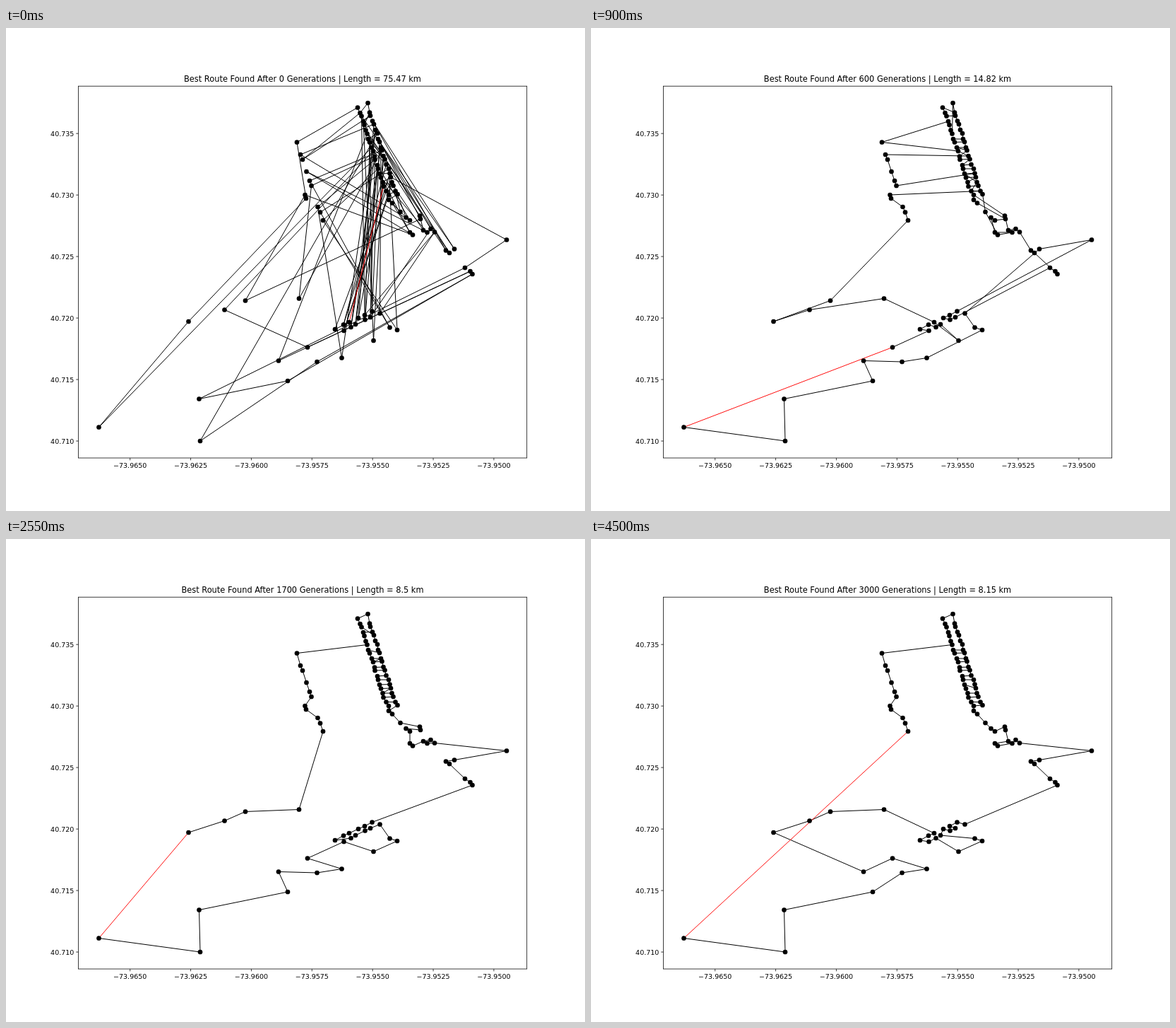
Write an HTML page that moves like this. It is 820x683 px and loops after 4650 ms.

```html
<!DOCTYPE html>
<html lang="en">
<head>
<meta charset="utf-8">
<style>
html, body { margin: 0; width: 100%; height: 100%; overflow: hidden; background: #fff; }
svg { display: block; }
text { font: 9.49px "DejaVu Sans", sans-serif; }
#title { font-size: 11.39px; }
path, rect { fill: none; stroke: #000; stroke-width: .76; }
#route { stroke-width: 1; stroke-linejoin: round; }
#closing { stroke: #f00; stroke-width: .95; }
</style>
</head>
<body>
<svg width="820" height="683" viewBox="0 0 820 683">
  <path id="route"/>
  <path id="closing"/>
  <g id="dots"></g>
  <rect x="102.5" y="82.2" width="635.2" height="525.8"/>
  <g id="axes"></g>
  <text id="title" x="420" y="76" text-anchor="middle"></text>
</svg>
<script>
const $ = id => document.getElementById(id);

// Stops as x, y pairs, grouped by area
const stops = {
  A: [412,161.5, 417,179, 420,186, 425.5,203, 430,216, 432.5,223, 423.5,236, 425,241,
    441.5,253, 445,260.5, 449,272],
  W: [498,112.5, 501.5,120, 503.5,124.5, 506,132, 507.5,137, 509.5,144.5, 511.5,149.5,
    513,157, 515,161.5, 518,169, 520,174, 522,181.5, 522.5,186, 526,194, 527,199, 529,206,
    531,211.5, 533.5,218, 534.5,224, 538.5,230.5, 542,236, 542,243, 547,247.5],
  E: [512.5,106, 515,119.5, 516,124, 519,131.5, 521,136, 523,144, 526,149, 527,157, 529,161,
    531,169, 532.5,173, 534.5,181, 536.5,185.5, 538.5,193, 542,199, 543.5,205.5, 545,211,
    546.5,218, 548.5,223, 551.5,230.5, 554.5,235],
  S: [558.5,260, 566.5,268, 572,272, 586,265.5, 587,270, 572,289, 576,292.5, 591,286,
    596.5,289, 601.5,284, 607,288.5, 623,314.5, 628,318, 635,312.5, 650,339, 657.5,344,
    660.5,348, 709,299.5],
  C: [518.5,400.5, 529.5,403.5, 516,409, 508,406, 508.5,412.5, 499,410, 495,419, 486,416,
    488.5,423, 478,419.5, 478.5,428, 466,426, 543.5,423.5, 554,427, 520.5,442, 475.5,466.5,
    427,451.5, 440.5,472, 386,470.5, 399,499, 273.5,524.5, 275,584, 131.5,564.5, 258.5,415,
    309.5,398.5, 339,385.5, 415,382.5]
};

// Route sections; "C22-17" runs through consecutive stops
const southLoop = 'C22-17 C15 C16 C10 C14-12 C6 C8 C11 C9 C7 C5 C4 C2 C3 C1 C0 ';
const east = 'S16-14 S12 S11 S13 S17 S10 S8 S9 S7-5 S2 S1 S4 S3 S0 W22 ';
const rungs = 'E20-19 W19-18 E18-17 W17 E16 W16-15 E15-14 W14-13 E13-12 W12-11 E11-10 W10 E9 W9-7 E8-7 ';
const west = 'A0-10 C26-23';
const shortNorth = 'S16-14 S12 S11 S13 S17 S10-8 S6 S5 S7 S4-0 W22-20 E20-19 W19-18 E18-17 W17-15 E16-14 ' +
  'W14-13 E13-12 W12-11 E11-10 W10-9 E9-8 W8-7 E7-0 W0-6 A0-10';

// First step of each route and its order of stops
const routes = [
  [0, 'W18 C5 E4 A1 S2 W13 C4 W8 C0 E8 S9 C2 W12 A8 C15 E5 C6 W14 A10 C13 E14 A9 C12 A4 E10 C26 ' +
    'A5 W11 C8 E9 C1 S10 C3 W2 S13 E3 S11 W5 S12 E7 S4 C25 A6 S6 A3 S8 W16 E11 C14 W3 E2 A2 W1 ' +
    'E0-1 W4 W0 A0 A7 C23-22 W9 E12 W7 E6 C21 C17 S16 C19-20 S14 S17 E16 W17 E18 S7 S3 W6 C18 S15 ' +
    'C16 C24 W10 E13 C9 E15 W15 S5 W22 S1 E20 W21 S0 E19 W20 C10 E17 W19 C11 C7'],
  [1, 'C0 C5 C2 C23-22 C18-21 C17 C24 C11 C7 C9 C25 C8 C10 C16 C13 C15 C12 C6 C14 C3-4 S14 S12 ' +
    'A6 A8 A7 E17 W17 E16 W16 A5 W3-4 E4-5 E7 A4 W8-10 A0 W6-5 E6 W7 A1-3 W11-12 E12 W13-14 A9 ' +
    'E10-11 E9-8 W15 E15-13 W19-18 E18 A10 C26 C1 S1 S9-10 S7-8 S5-6 S4-2 S0 W22-20 E20-19 ' +
    'W2-0 E0-3 S13 S11 S15-17'],
  [4, 'C22-17 C15 C13-12 C1 S13 S17 C0 C3 C5-4 C2 S14-16 S12-9 S7 S3 W20-22 S4 S2-1 S5 S8 S6 S0 ' +
    'E20 E18 W18-17 E16 W16 W14 E14-13 W13 E12 W12-11 E10 W9 E9-8 W8-7 E7-2 W2-0 E1-0 W6-3 ' +
    'A0 W10 E11 A1-5 E15 W15 E17 W19 E19 A6-10 C25 C23-24 C26 C7 C14 C6 C8 C9 C11-10 C16'],
  [9, 'C22-17 C15 C16 C10 C14-12 C8 C11 C9 C7 C5 C3-4 C6 C2-0 S16-14 S12-11 S13 S17 S9-10 S8-7 ' +
    'S5-6 S2-1 S4 S0 S3 E20 W22-19 E19-18 W18-17 E17-16 W16-15 E15-14 W14-13 E13-12 W12-11 ' +
    'E11-10 W10-9 E9-8 W8-7 E7-5 W5-6 E4 E2 W2-0 E0-1 E3 W3-4 A0-10 C25-26 C24-23'],
  [15, 'C22-17 C15 C16 C10 C14-12 C1-2 C4 C6 C8 C11 C9 C7 C5 C3 C0 ' + east + 'W20-21 ' + rungs +
    'E6-4 W2-0 E0-3 W3-6 ' + west],
  [21, southLoop + east + 'W21-20 ' + rungs + 'E6-0 W0-6 ' + west],
  [29, 'C22-19 C17 C15-16 C18 C23-26 C7 C9 C11-10 C8 C14-12 C6-4 C2-3 C0-1 ' + shortNorth]
];

// Known route lengths in km by step
const lengths = [[0, 75.47], [2, 28.53], [6, 14.82], [12, 9.2], [17, 8.5], [25, 8.28], [30, 8.15]];

const point = (group, i) => stops[group].slice(2 * i, 2 * i + 2);

function expand(order) {
  return order.trim().split(' ').flatMap(token => {
    const [from, to = from] = token.slice(1).split('-').map(Number);
    const dir = to < from ? -1 : 1;
    return Array.from({ length: Math.abs(to - from) + 1 }, (_, i) => point(token[0], from + i * dir));
  });
}

function lengthAt(step) {
  const i = Math.max(1, lengths.findIndex(([s]) => s >= step));
  const [[s0, a], [s1, b]] = [lengths[i - 1], lengths[i]];
  return +(a * (b / a) ** ((step - s0) / (s1 - s0))).toFixed(2);
}

const line = points => 'M' + points.map(p => p.join()).join('L');
const paths = routes.map(([start, order]) => {
  const points = expand(order);
  return { start, route: line(points), closing: line([points.at(-1), points[0]]) };
});

$('dots').innerHTML = Object.entries(stops).map(([group, list]) =>
  Array.from({ length: list.length / 2 }, (_, i) => {
    const [x, y] = point(group, i);
    return `<circle cx="${x}" cy="${y}" r="3.35"/>`;
  }).join('')).join('');

let axes = '';
for (let i = 0; i < 7; i++) {
  const x = 175.7 + 85.87 * i;
  axes += `<path d="M${x} 608v3.3"/><text x="${x}" y="622" text-anchor="middle">\u2212${(73.965 - .0025 * i).toFixed(4)}</text>`;
}
for (let i = 0; i < 6; i++) {
  const y = 149.2 + 86.97 * i;
  axes += `<path d="M102.5 ${y}h-3.3"/><text x="96.3" y="${y + 3.5}" text-anchor="end">${(40.735 - .005 * i).toFixed(3)}</text>`;
}
$('axes').innerHTML = axes;

let shown = -1;
const begin = performance.now();
function draw() {
  const step = Math.floor((performance.now() - begin) % 4650 / 150);
  if (step !== shown) {
    shown = step;
    const { route, closing } = paths.findLast(p => p.start <= step);
    $('route').setAttribute('d', route);
    $('closing').setAttribute('d', closing);
    $('title').textContent = `Best Route Found After ${step * 100} Generations | Length = ${lengthAt(step)} km`;
  }
  requestAnimationFrame(draw);
}
draw();
</script>
</body>
</html>
```
